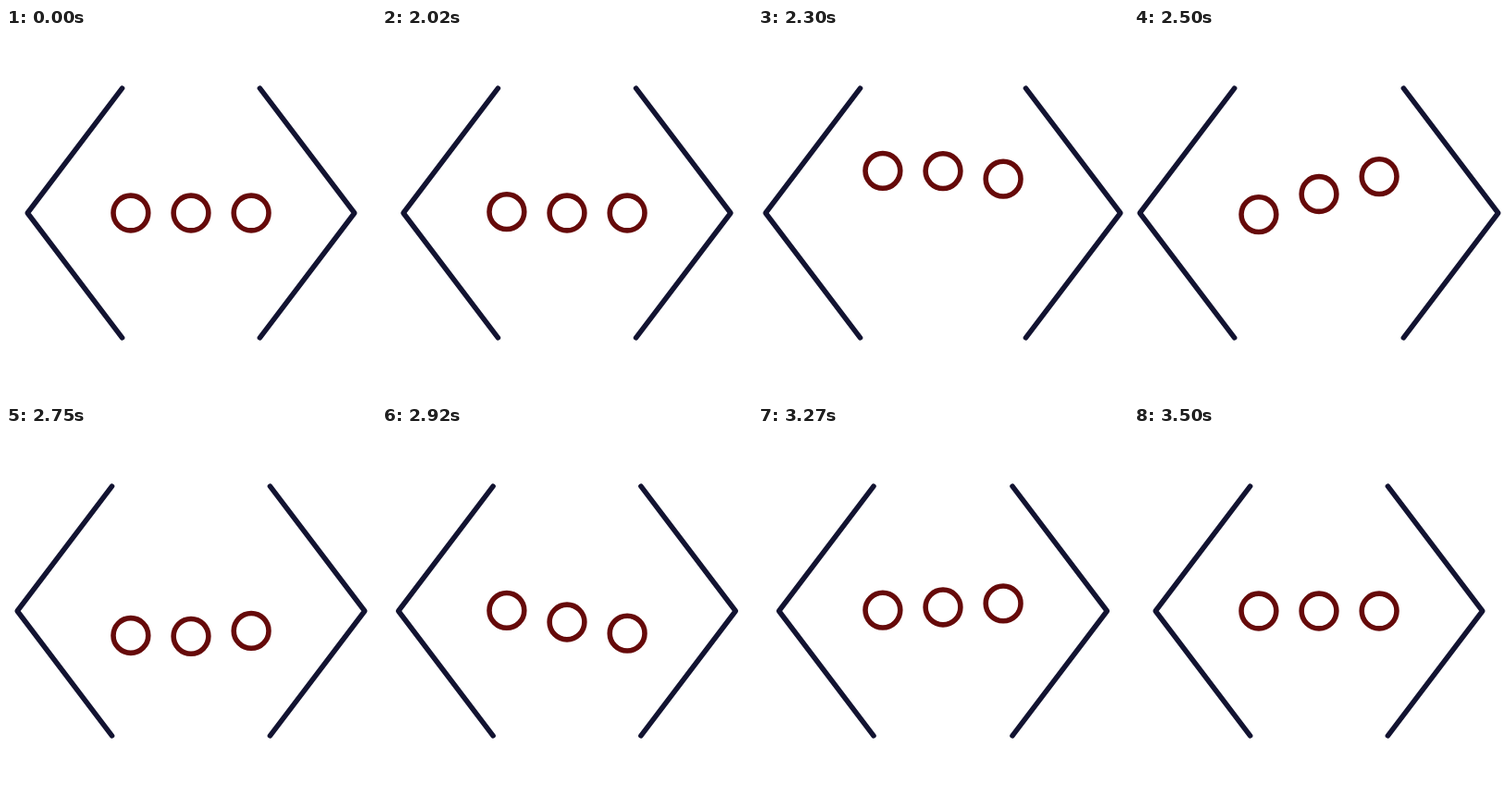
An HTML page that plays this animation: 400x400 px, repeating every 3520 ms.

```html
<!DOCTYPE html>
<html lang="en">
<head>
<meta charset="utf-8">
<title>Code loader</title>
<style>
  html, body { margin: 0; height: 100%; overflow: hidden; background: #fff; }
  svg { display: block; width: 100%; height: 100%; }
  svg * { fill: none; stroke-width: 6; stroke-linecap: round; stroke-linejoin: round; }
  path { stroke: #121331; }
  circle { stroke: #660a0a; }
</style>
</head>
<body>
<svg viewBox="-215 -215 430 430">
  <path id="left" d="M-80-145-190 0-80 145"/>
  <path id="right" d="M80-145 190 0 80 145"/>
  <circle cx="-70" r="20.3"/>
  <circle r="20.3"/>
  <circle cx="70" r="20.3"/>
</svg>
<script>
const LOOP = 3520, REST = 2000, STEP = 25, STAGGER = 75;

// Keyframes: [time, value, x of first handle, x of second handle]
const BOUNCE = [[0, 0], [272, -50, .333, .315], [709, 30, .345, .48], [1065, -10, .35, .48], [1350, 0, .35, .48]];
const SPREAD = [[0, 0], [433, 18.5, .333, .45], [1500, 0, .333, .3]];

const left = document.getElementById('left');
const right = document.getElementById('right');
const dots = document.querySelectorAll('circle');

// Cubic bezier easing with handles (x1, 0) and (x2, 1)
function ease(x, x1, x2) {
  let low = 0, high = 1, t;
  for (let i = 0; i < 24; i++) {
    t = (low + high) / 2;
    const at = 3 * (1 - t) * t * ((1 - t) * x1 + t * x2) + t ** 3;
    if (at < x) low = t; else high = t;
  }
  return t * t * (3 - 2 * t);
}

function valueAt(keys, time) {
  if (time <= 0) return 0;
  const next = keys.findIndex(key => key[0] > time);
  if (next < 0) return keys[keys.length - 1][1];
  const [t0, v0] = keys[next - 1];
  const [t1, v1, x1, x2] = keys[next];
  return v0 + (v1 - v0) * ease((time - t0) / (t1 - t0), x1, x2);
}

function draw(now) {
  const time = Math.floor((now % LOOP + 5) / STEP) * STEP - REST;
  const spread = valueAt(SPREAD, time);
  left.setAttribute('transform', `translate(${-spread})`);
  right.setAttribute('transform', `translate(${spread})`);
  dots.forEach((dot, i) => dot.setAttribute('cy', valueAt(BOUNCE, time - i * STAGGER)));
}

const start = performance.now();
function tick() {
  draw(performance.now() - start);
  requestAnimationFrame(tick);
}
tick();
</script>
</body>
</html>
```
